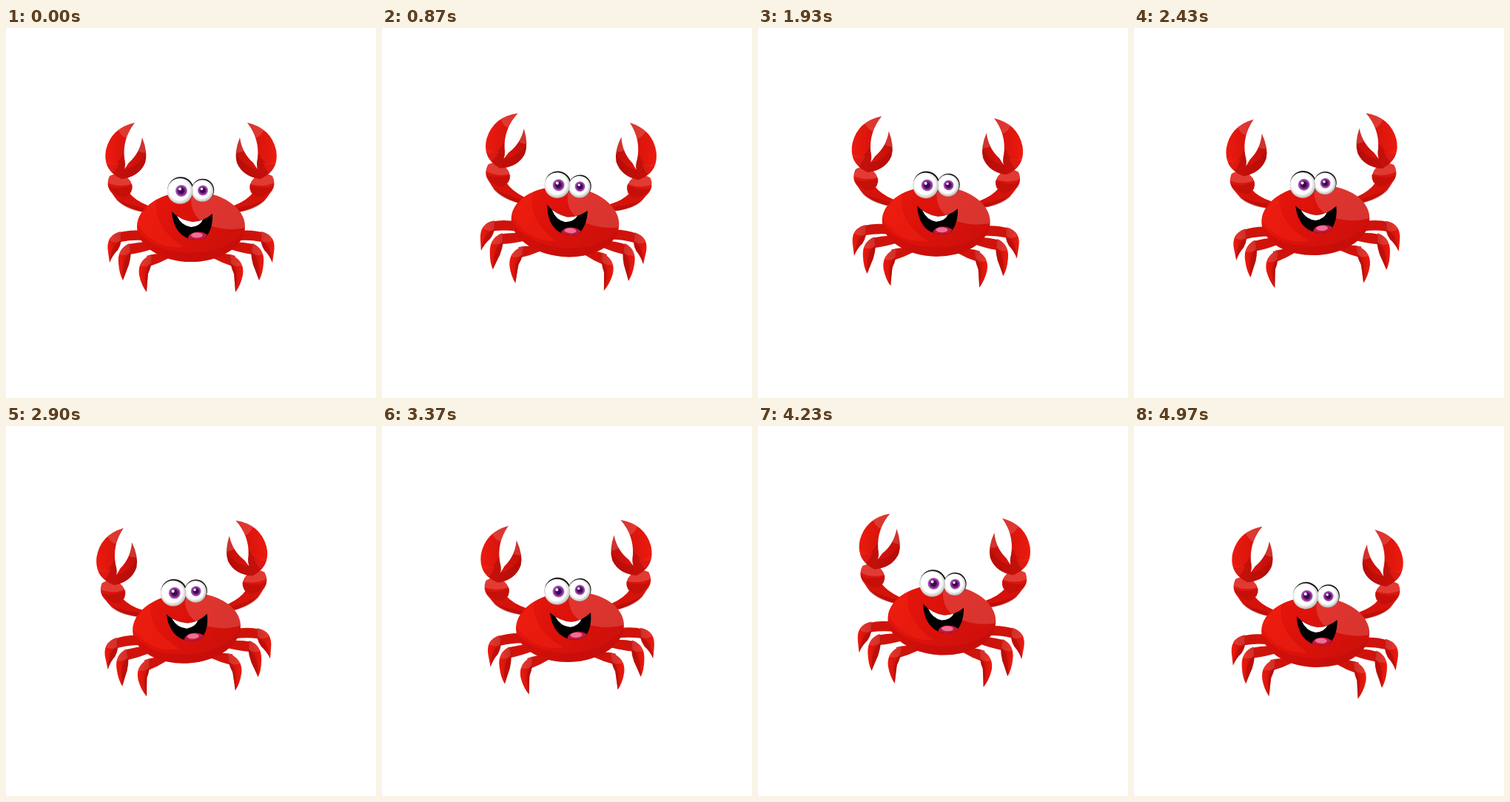
Recreate the animation shown at these times as an HTML page. Size 500 px wide and 500 px high, loop 5010 ms.

```html
<!DOCTYPE html>
<html lang="en">
<head>
<meta charset="utf-8">
<title>Dancing crab</title>
<style>
  html, body { margin: 0; width: 100%; height: 100%; overflow: hidden; background: #fff; }
  svg { display: block; width: 100%; height: 100%; }
</style>
</head>
<body>
<svg viewBox="0 0 500 500">
  <defs>
    <linearGradient id="shell" x1="0" y1="0" x2="1" y2=".5">
      <stop offset="0" stop-color="#e9170c"/>
      <stop offset=".5" stop-color="#dc120b"/>
      <stop offset="1" stop-color="#cf100b"/>
    </linearGradient>
    <linearGradient id="limb" x1="0" y1="0" x2="1" y2="0">
      <stop offset="0" stop-color="#ec1a0e"/>
      <stop offset="1" stop-color="#c20f0a"/>
    </linearGradient>
    <radialGradient id="ball" cx=".47" cy=".45" r=".54">
      <stop offset=".72" stop-color="#fff"/>
      <stop offset="1" stop-color="#bdbdbd"/>
    </radialGradient>
    <radialGradient id="iris">
      <stop offset=".4" stop-color="#3b0a48"/>
      <stop offset=".7" stop-color="#8a2a9c"/>
      <stop offset="1" stop-color="#b777c2"/>
    </radialGradient>
    <clipPath id="bodyClip"><ellipse cx="250" cy="268.5" rx="73" ry="47.5"/></clipPath>
    <clipPath id="clawClip"><path id="claw" d="M174 128Q142 135 135 165Q131 188 149 200L156 204Q180 201 188 182Q192 168 184 148Q181 169 166 182L160 191Q162 184 160 176Q157 150 174 128Z"/></clipPath>
    <clipPath id="mouthClip"><path id="mouth" d="M224 248Q236 260 252 262Q266 262 279 251Q280 272 269 284Q256 289 243 283Q226 274 224 248Z"/></clipPath>

    <g id="side">
      <!-- legs -->
      <g fill="#cf130b">
        <path d="M186 274Q166 272 151 277L155 289Q170 286 186 287Z"/>
        <path d="M196 289Q178 289 163 293L167 306Q182 304 200 298Z"/>
        <path d="M218 305Q203 304 190 308L194 322Q207 318 220 311Z"/>
      </g>
      <g fill="url(#limb)">
        <path d="M155 275Q134 280 138 303L140 317Q144 307 151 300Q158 290 155 275Z"/>
        <path d="M167 291Q150 298 152 318Q153 332 158 341Q162 330 166 320Q171 304 167 291Z"/>
        <path d="M197 306Q177 314 180 334Q183 348 190 357Q191 342 192 332Q198 320 197 306Z"/>
      </g>
      <path fill="#a90b08" opacity=".55" d="M154 289Q142 292 140 317Q144 307 151 300ZM168 304Q156 310 158 341Q162 330 166 320ZM196 319Q184 326 190 357Q191 342 192 332Z"/>
      <path fill="#fff" opacity=".13" d="M155 275Q143 277 140 287Q149 292 155 287ZM167 291Q156 295 153 306Q162 309 168 303ZM197 306Q185 309 181 321Q190 324 196 318Z"/>
      <!-- arm -->
      <path fill="#d5130b" d="M142 220Q150 241 186 249L192 240Q174 233 166 222Z"/>
      <path fill="#a90b08" opacity=".5" d="M148 231Q160 245 186 249L189 244Q164 239 148 231Z"/>
      <path fill="#db150d" d="M140 200Q152 193 164 202Q174 212 169 222Q160 233 146 226Q133 215 140 200Z"/>
      <path fill="#a90b08" opacity=".45" d="M138 214Q153 219 171 212Q171 222 162 228Q149 231 138 214Z"/>
      <path fill="#fff" opacity=".16" d="M140 200Q152 193 164 202Q168 206 169 211Q153 216 137 209Z"/>
      <!-- claw -->
      <use href="#claw" fill="url(#limb)"/>
      <g clip-path="url(#clawClip)">
        <path fill="#a90b08" opacity=".5" d="M133 183Q149 191 159 168L162 190Q179 188 192 166V206H142Z"/>
        <path fill="#f0241a" opacity=".5" d="M134 176Q143 186 153 181Q147 197 140 198Z"/>
        <path fill="#fff" opacity=".15" d="M150 134Q155 147 163 149L178 126ZM176 164Q183 170 192 168V145H180Z"/>
      </g>
    </g>
  </defs>

  <g id="crab">
    <use href="#side"/>
    <use href="#side" transform="matrix(-1 0 0 1 500 0)"/>
    <ellipse cx="250" cy="268.5" rx="73" ry="47.5" fill="url(#shell)"/>
    <g clip-path="url(#bodyClip)">
      <path fill="#b90c08" opacity=".4" d="M176 270Q196 303 250 304Q305 302 325 270V320H176Z"/>
      <path fill="#fa2a14" opacity=".35" d="M207 220Q190 264 240 296Q198 300 176 262Z"/>
      <path fill="#fff" opacity=".15" d="M252 215Q241 264 292 271Q312 274 330 268V215Z"/>
    </g>
    <use href="#mouth"/>
    <g clip-path="url(#mouthClip)">
      <path fill="#fff" d="M231 254Q250 264 266 259Q262 268 250 269Q237 267 231 254Z"/>
      <ellipse cx="260" cy="284" rx="14" ry="8.5" fill="#c5163f"/>
      <ellipse cx="258" cy="280" rx="8" ry="3.5" fill="#ef6f92"/>
    </g>
    <circle cx="236" cy="219" r="17.8" fill="#161010"/>
    <circle cx="266" cy="219" r="15.2" fill="#161010"/>
    <circle cx="265.4" cy="220" r="14.8" fill="url(#ball)"/>
    <circle cx="235.2" cy="220.4" r="17.4" fill="url(#ball)"/>
    <circle cx="237" cy="220" r="8" fill="url(#iris)"/>
    <circle cx="266" cy="219.5" r="7" fill="url(#iris)"/>
    <circle cx="235" cy="217.5" r="2" fill="#fff"/>
    <circle cx="264.5" cy="217.5" r="1.7" fill="#fff"/>
  </g>
</svg>
<script>
const LOOP = 5010, STEP = LOOP / 150;

// time, centre x, centre y, tilt in degrees
const poses = [
  [0, 250, 268.3, 0],
  [530, 250.5, 262.5, 3.6],
  [700, 250.3, 261.5, 4.6],
  [870, 247.5, 261.5, 4.8],
  [1070, 242.3, 262, 4.4],
  [1470, 241, 262, 4],
  [1600, 240.5, 261.8, 3.6],
  [2130, 241.5, 260.3, -1],
  [2430, 245.5, 259.5, -3.3],
  [2670, 244.6, 266, -3.6],
  [3000, 244.2, 276.3, -3.9],
  [3200, 247, 275, -3.4],
  [3370, 255, 270.5, -3],
  [3730, 259.8, 266, -3.8],
  [4230, 248, 261.8, 2.6],
  [4500, 246.5, 266, 4.3],
  [4700, 242, 276, 4.3],
  [4830, 242, 279, 3.8],
  [4970, 246, 278, 1.2],
  [LOOP, 247, 277, 0.5]
];

const slope = (i, k) => {
  const a = poses[Math.max(i - 1, 0)], b = poses[Math.min(i + 1, poses.length - 1)];
  return (b[k] - a[k]) / (b[0] - a[0]);
};

// cubic Hermite curve through the poses
function poseAt(t) {
  const i = poses.findIndex(p => p[0] > t) - 1;
  const a = poses[i], b = poses[i + 1], d = b[0] - a[0], u = (t - a[0]) / d, v = 1 - u;
  return [1, 2, 3].map(k =>
    v * v * ((1 + 2 * u) * a[k] + u * d * slope(i, k)) +
    u * u * ((1 + 2 * v) * b[k] - v * d * slope(i + 1, k)));
}

const crab = document.getElementById("crab");
const start = performance.now();

function draw() {
  const t = (performance.now() - start) % LOOP;
  const [x, y, tilt] = poseAt(Math.floor(t / STEP) * STEP);
  crab.setAttribute("transform", `translate(${x} ${y}) rotate(${tilt}) translate(-250 -268.3)`);
  requestAnimationFrame(draw);
}
draw();
</script>
</body>
</html>
```
